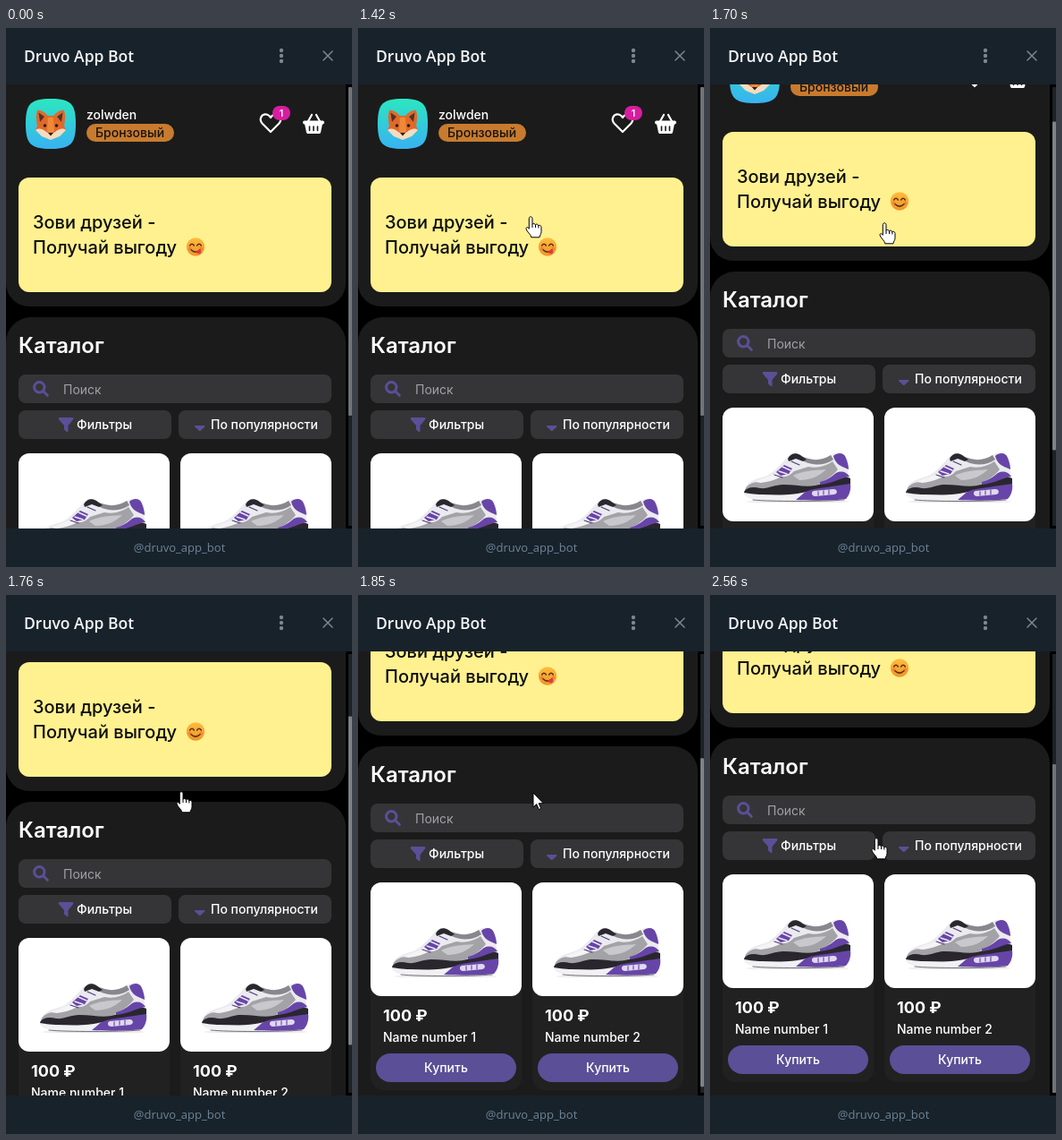
An HTML page for the animation above (2890 ms loop, 387x602 px).

```html
<!DOCTYPE html>
<html lang="ru">
<head>
<meta charset="utf-8">
<title>Shop</title>
<style>
html, body { margin: 0; width: 100%; height: 100%; overflow: hidden; background: #000; }
svg { display: block; width: 387px; height: 602px; font: 500 14px Inter, sans-serif; font-optical-sizing: none; fill: #fff; }
.ui { font-family: "Open Sans", sans-serif; }
.bar { fill: #18222b; }
.panel { fill: #1b1b1b; }
.field { fill: #353537; }
.accent { fill: #5b4f97; }
.line { fill: none; stroke-linecap: round; stroke-linejoin: round; }
.mid { text-anchor: middle; }
.cursor { stroke: #000; stroke-width: 1; stroke-linejoin: round; }
</style>
</head>
<body>
<svg viewBox="0 0 387 602">
  <defs>
    <clipPath id="view"><rect y="63" width="387" height="496"/></clipPath>
    <linearGradient id="sky" x2="0" y2="1">
      <stop stop-color="#2ce6c0"/><stop offset="1" stop-color="#38b2f2"/>
    </linearGradient>
    <linearGradient id="face" x2="0" y2="1">
      <stop stop-color="#ffbc3d"/><stop offset="1" stop-color="#f09428"/>
    </linearGradient>

    <g id="shoe">
      <ellipse cx="84" cy="105" rx="58" ry="1.200" fill="#e4e4e6"/>
      <path fill="#ebeaee" d="M25 92C26 84 35 80 47 77C56 74 62 66 69 59C73 54 77 50 83 51L92 55C103 60 113 58 121 53C128 49 135 50 137 55C140 64 142 74 142 88Z"/>
      <path fill="#a3a2a7" d="M25 93C26 86 34 83 43 82C50 84 57 80 64 77C72 78 76 75 80 71L96 66C107 68 116 65 123 60L129 69C123 77 113 82 105 87L142 82V94H25Z"/>
      <path fill="#f4f3f6" d="M36 83C44 79 54 77 60 73L66 77C58 81 51 83 43 84Z"/>
      <path fill="#c9c8cd" d="M79 76C88 71 100 70 116 69C109 76 99 81 86 81Z"/>
      <path fill="#89878e" d="M84 54L93 56C104 60 113 58 121 53L124 58C114 65 101 65 91 60Z"/>
      <path fill="#2a282f" d="M73 57C76 51 82 50 87 53L94 58L90 60L82 57L74 60Z"/>
      <path fill="#6745a8" d="M124 54C130 49 136 51 138 56C140 61 141 65 141 69L134 66C129 64 125 59 124 54Z"/>
      <path fill="#6745a8" d="M60 72L69 64L78 68L74 74L65 76Z"/>
      <path class="line" stroke="#ebe9f0" stroke-width="1.400" d="M63 71L72 74M67 66L76 70M71 61L80 65"/>
      <path class="line" stroke="#4b3a79" stroke-width="1.100" d="M58 75L67 78M77 60L86 64"/>
      <path fill="#29272d" d="M24 94C27 89 34 88 42 90C51 91 58 86 68 86C82 86 92 89 104 87L124 81C131 76 138 77 143 79V90L84 98L25 97Z"/>
      <path fill="#6745a8" d="M109 83C117 81 122 77 127 73C133 70 139 72 142 77C133 78 123 85 109 86Z"/>
      <path fill="#f1f0f3" d="M24 95C42 98 65 99 84 96L105 92L143 88C143 94 141 100 137 103C112 105 58 105 36 103C29 101 24 99 24 95Z"/>
      <path fill="#6745a8" d="M88 98C95 90 112 90 122 88L143 85C144 91 142 98 138 102C122 104 100 104 82 103Z"/>
      <path fill="#e0d8ee" d="M102 93L124 91C129 91 129 96 125 97L104 99C99 99 99 94 102 93Z"/>
      <path class="line" stroke="#8468bc" stroke-width="1.500" d="M107 94V98M113 93V97M119 92V97"/>
      <path class="line" stroke="#55505c" stroke-width=".800" d="M34 103C54 105 111 105 136 103"/>
    </g>

    <g id="card">
      <rect width="169" height="232" rx="14" fill="#212121"/>
      <rect width="169" height="127" rx="12"/>
      <use href="#shoe"/>
      <text x="14" y="155" font-size="18" font-weight="700">100 ₽</text>
      <rect class="accent" x="6" y="191" width="157" height="32" rx="16"/>
      <text class="mid" x="84.500" y="212">Купить</text>
    </g>
  </defs>

  <g clip-path="url(#view)">
    <g id="page">
      <rect class="panel" y="23" width="380" height="288" rx="26"/>

      <path fill="url(#sky)" d="M50 79C27.600 79 22 84.600 22 107S27.600 135 50 135S78 129.400 78 107S72.400 79 50 79Z"/>
      <g>
        <path fill="#e06a2a" d="M35 92C39 91 44 95 47 98H53C56 95 61 91 65 92C67 98 66 104 65 109L67 114L59 121L50 125L41 121L33 114L35 109C34 104 33 98 35 92Z"/>
        <path fill="#54302a" d="M36.500 94.500L43 99L38 105ZM63.500 94.500L57 99L62 105Z"/>
        <path fill="#f3dcc2" d="M33 114C37 111 41 113 45 116L50 119L55 116C59 113 63 111 67 114L60 121L50 125L40 121Z"/>
        <path fill="#ee8a3a" d="M47 100H53L54 115L50 119L46 115Z"/>
        <circle cx="43.500" cy="109" r="1.800" fill="#2c1b18"/>
        <circle cx="56.500" cy="109" r="1.800" fill="#2c1b18"/>
        <path fill="#2c1b18" d="M47 117H53L50 120.500Z"/>
      </g>

      <text x="90" y="102">zolwden</text>
      <rect x="90" y="107" width="98" height="20" rx="10" fill="#c87b2e"/>
      <text x="100" y="122" fill="#161210">Бронзовый</text>

      <path class="line" stroke="#fff" stroke-width="2.200" d="M296 116L286.500 106.500C282.500 101.500 286 96 291 96.500C293.500 96.700 295 98.500 296 100C297 98.500 298.500 96.700 301 96.500C306 96 309.500 101.500 305.500 106.500Z"/>
      <rect x="298" y="87" width="20" height="16" rx="8" fill="#d81e9f"/>
      <text class="mid" x="308" y="98.800" font-size="10.500" font-weight="600">1</text>

      <path class="line" stroke="#fff" stroke-width="2.200" d="M337.500 105L342 97M351.500 105L347 97"/>
      <rect x="332" y="103.500" width="24" height="4" rx="1.800"/>
      <path d="M334 107H354L352 116.500C351.700 117.600 351 118 350 118H338C337 118 336.300 117.600 336 116.500Z"/>
      <path class="line" stroke="#1b1b1b" stroke-width="1.600" d="M339.500 110V114.500M344 110V114.500M348.500 110V114.500"/>

      <rect x="14" y="167" width="350" height="128" rx="12" fill="#fff18f"/>
      <g font-size="20" fill="#0d0d0d">
        <text x="30" y="224">Зови друзей -</text>
        <text x="30" y="252">Получай выгоду</text>
      </g>
      <g transform="translate(212 244.500)">
        <circle r="10.200" fill="url(#face)"/>
        <circle cx="-6.300" cy="2" r="2" fill="#f5813a"/>
        <circle cx="6.300" cy="2" r="2" fill="#f5813a"/>
        <path class="line" stroke="#583015" stroke-width="1.500" d="M-6.300-1.500Q-4-5-1.700-1.500M1.700-1.500Q4-5 6.300-1.500M-5 3.200Q0 8 5 3.200"/>
        <path id="tongue" fill="#e5364b" d="M0 5.300L5 3C8.500 6.500 3.500 10.500 0 5.300Z"/>
      </g>

      <rect class="panel" y="323" width="380" height="440" rx="28"/>
      <text x="14" y="363" font-size="24" font-weight="600">Каталог</text>

      <rect class="field" x="14" y="387" width="350" height="32" rx="8"/>
      <g class="line" stroke="#5b4f97" stroke-width="3">
        <circle cx="37.300" cy="401.300" r="5.700"/>
        <path d="M41.800 405.800L46.300 410.300"/>
      </g>
      <text x="64" y="409" font-weight="400" fill="#a0a0a6">Поиск</text>

      <rect class="field" x="14" y="427" width="171" height="32" rx="8"/>
      <path class="accent" d="M60 435H74C75.500 435 75.800 436.500 75 437.500L69.500 444V450C69.500 451.200 68.500 451.300 67.700 450.700L65 448.500V444L59.200 437.500C58.300 436.500 58.700 435 60 435Z"/>
      <text x="79" y="448">Фильтры</text>

      <rect class="field" x="193" y="427" width="171" height="32" rx="8"/>
      <path class="accent" d="M212 444H221.500C222.500 444 222.800 445 222.200 445.600L217.600 449.800Q216.800 450.400 216 449.800L211.300 445.600C210.700 445 211 444 212 444Z"/>
      <text x="229" y="448">По популярности</text>

      <use href="#card" x="14" y="475"/>
      <use href="#card" x="195" y="475"/>
      <text x="28" y="653">Name number 1</text>
      <text x="209" y="653">Name number 2</text>
    </g>
    <rect x="383" y="66" width="4" height="490" fill="#1d2228"/>
    <rect id="thumb" x="383" width="4" height="367" rx="1"/>
  </g>

  <rect class="bar" width="387" height="63"/>
  <text class="ui" x="20" y="38" font-size="17.500" font-weight="600" fill="#f4f5f6">Druvo App Bot</text>
  <g fill="#7b8790">
    <circle cx="308" cy="25" r="2.200"/><circle cx="308" cy="31" r="2.200"/><circle cx="308" cy="37" r="2.200"/>
  </g>
  <path class="line" stroke="#7b8790" stroke-width="1.500" d="M355 26L365 36M365 26L355 36"/>

  <rect class="bar" y="559" width="387" height="43"/>
  <text class="ui mid" x="194" y="585" font-size="13" font-weight="400" fill="#6f8497">@druvo_app_bot</text>

  <g id="cursor" class="cursor">
    <path id="arrow" d="M0 0V16L3.700 12.600L6.300 18.500L8.700 17.400L6.200 11.700H11.300Z"/>
    <g id="hand" transform="translate(0 -.500)">
      <path d="M-1.700 2.200C-1.700-.300 2-.300 2 2.200V9C2.300 7.400 5 7.500 5.400 9.400C6 8 8.500 8.400 8.800 10.400C9.800 9.200 12 10 12 12V17C12 20 10.300 20.500 10 23.300H.800C.500 20 -3.800 17.500-4.800 14.300C-5.500 11.700-3 11.300-1.700 13.800Z"/>
      <path fill="none" d="M2 9V12.500M5.500 9.500V12.500M8.900 10.500V13"/>
    </g>
  </g>
</svg>
<script>
const LOOP = 2890, SCROLL_MAX = 163;
const [page, thumb, tongue, cursor, arrow, hand] =
  ["page", "thumb", "tongue", "cursor", "arrow", "hand"].map(id => document.getElementById(id));

const phase = (t, a, b) => Math.min(1, Math.max(0, (t - a) / (b - a)));
const mix = (a, b, u) => a + (b - a) * u;
const easeOut = (u, power) => 1 - (1 - u) ** power;
const show = (el, on) => el.setAttribute("visibility", on ? "visible" : "hidden");

function snap(t) {
  const start = [2470, 1490, 1000, 960].find(s => t >= s) ?? 0;
  return start + Math.floor((t - start) / 30) * 30;
}

function scrollAt(t) {
  if (t < 1700) return 51 * phase(t, 1460, 1700) ** 3;
  if (t < 1850) return mix(51, 154, phase(t, 1700, 1850));
  return mix(154, SCROLL_MAX, easeOut(phase(t, 1850, 1910), 2));
}

function pointerAt(t) {
  if (t < 1460) {
    const u = phase(t, 960, 1420);
    return [mix(258, 193, easeOut(u, 1.6)), mix(592, 211, easeOut(u, 1.9))];
  }
  if (t < 2440) {
    const u = phase(t, 1460, 1790);
    return [mix(193, 196, u), mix(211, 221, u)];
  }
  const u = phase(t, 2440, 2560);
  return [mix(196, 186, u), mix(221, 272, easeOut(u, 1.4))];
}

function draw(time) {
  const t = snap(time);
  const scroll = Math.round(scrollAt(t));
  const [x, y] = pointerAt(t).map(Math.round);
  const seen = t >= 960;
  const onLink = (y < 295 && t < 1790) || t >= 2530;

  page.setAttribute("transform", `translate(0 ${-scroll})`);
  thumb.setAttribute("y", 66 + scroll * 123 / SCROLL_MAX);
  thumb.setAttribute("fill", time >= 1490 && time < 2140 ? "#7f8286" : "#717478");
  show(tongue, t < 1580 || (t >= 1820 && t < 1880));
  cursor.setAttribute("transform", `translate(${x} ${y})`);
  show(arrow, seen && !onLink);
  show(hand, seen && onLink);
}

const begin = performance.now();
function tick() {
  draw((performance.now() - begin) % LOOP);
  requestAnimationFrame(tick);
}
tick();
</script>
</body>
</html>
```
